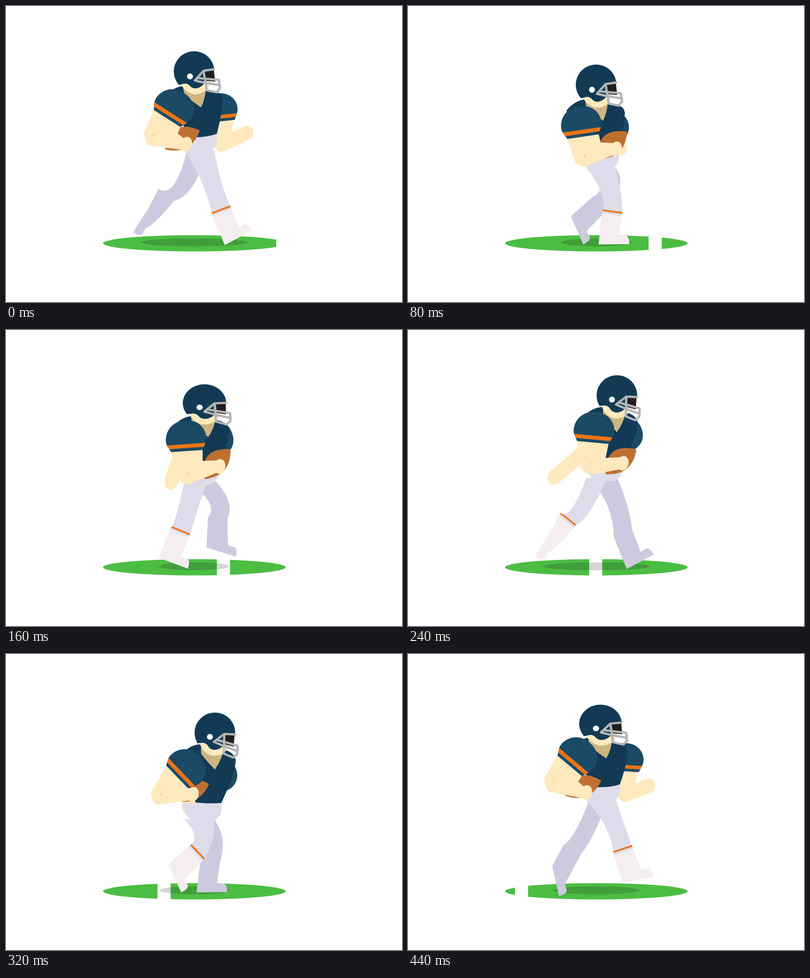
Animation of 800x600 px, one loop 480 ms. Source, as an HTML page with a canvas:

```html
<!DOCTYPE html>
<html lang="en">
<head>
<meta charset="utf-8">
<title>Running player</title>
<style>
  html, body { margin: 0; width: 100%; height: 100%; overflow: hidden; background: #fff; }
  canvas { display: block; width: 800px; height: 600px; }
</style>
</head>
<body>
<canvas id="stage" width="800" height="600"></canvas>
<script>
const ctx = document.getElementById('stage').getContext('2d');
const STEP = 40, STEPS = 12;
const NAVY = '#123a54', SLEEVE = '#1a4a66', ORANGE = '#ee7414', SKIN = '#ffe9bd',
      PANTS = '#dedbea', FAR_LEG = '#cccade', SOCK = '#f5edef';

const rad = deg => deg * Math.PI / 180;

// Harmonics of the running cycle, shared by every limb.
function cycle(k) {
  const a = 2 * Math.PI * k / STEPS;
  return {
    c1: Math.cos(a), s1: Math.sin(a),
    c2: Math.cos(2 * a), s2: Math.sin(2 * a), c3: Math.cos(3 * a)
  };
}

// Whole-body motion: quick drop on landing, slower rise, sway to and fro.
function bodyAt(k) {
  const p = k % (STEPS / 2);
  const bob = p < 2 ? p / 2 : ((6 - p) / 4) ** .8;
  const drop = bob * bob;
  const lean = 1.155 * Math.cos(2 * Math.PI * (k - 7) / STEPS);
  const sway = Math.max(-1, Math.min(1, lean));
  return {
    ...cycle(k), drop, sway,
    squash: p > 2 ? .07 * Math.sin(Math.PI * (p - 2) / 4) : 0,
    head: [401 + 21 * sway, 133 + 27 * bob],
    belt: [430.5 + 4.5 * sway, 263 + 4 * sway + 35 * drop]
  };
}

// Maps local coordinates to the stage.
function frame(x, y, deg) {
  const c = Math.cos(rad(deg)), s = Math.sin(rad(deg));
  return (u, v) => [x + u * c - v * s, y + u * s + v * c];
}

function fill(shape, color) {
  ctx.fillStyle = color;
  ctx.fill(typeof shape === 'string' ? new Path2D(shape) : shape);
}

function oval(x, y, rx, ry, color, deg = 0) {
  ctx.fillStyle = color;
  ctx.beginPath();
  ctx.ellipse(x, y, rx, ry, rad(deg), 0, 7);
  ctx.fill();
}

function local(x, y, deg, sx, sy, draw) {
  ctx.save();
  ctx.translate(x, y);
  ctx.scale(sx, sy);
  ctx.rotate(rad(deg));
  draw();
  ctx.restore();
}

function ground(k, { c2 }) {
  oval(380.5, 481, 184.5, 16.5, '#4cbd43');
  ctx.fillStyle = '#fff';
  ctx.fillRect(546 - 30 * k, 460, 26.5, 40);
  oval(380.5, 479, 71 + 37 * ((c2 + .5) / 1.5) ** 2, 8, 'rgba(20,20,25,.18)');
}

function leg(k, belt, far) {
  const { c1, s1, c2, s2, c3 } = cycle(k);
  const heel = [360 + 76 * c1 - 11.5 * s1 + 6 * c2,
                450.5 + 32 * c1 + 22.5 * s1 - 5 * c2 + 2 * s2 + 7 * c3];
  const sole = 33 - 62 * c1 - 18.5 * s1 + 14 * c2 + 8 * s2 - 13.5 * c3;
  const tilt = 16 - 30 * c1 - 5 * s1 - 7 * c2 + 9 * s2;
  const kx = 394 + 32 * c1 - 13 * s1 - 11 * c2 + 6 * s2 + (far ? 8 : 0);
  const ky = 362 - 3 * c1 + 8 * s1 - 3 * c2 + 8 * s2;
  const hipL = far ? 366 : 360, hipR = 414 + .3 * (kx - 394), hipY = belt[1] + 33;

  const foot = frame(...heel, sole), ankle = foot(41, -17);
  const stripe = frame(...foot(20, -9), tilt)(0, -58);
  const band = frame(...stripe, tilt);
  const l = band(-20, 0), r = band(20, 0);
  const shin = Math.hypot(ankle[0] - r[0], ankle[1] - r[1]);

  const path = new Path2D();
  const through = (x0, y0, x, y, x1, y1) =>
    path.quadraticCurveTo(2 * x - (x0 + x1) / 2, 2 * y - (y0 + y1) / 2, x1, y1);
  path.moveTo(hipL, hipY);
  through(hipL, hipY, kx - 20, ky, ...l);
  path.lineTo(...heel);
  path.lineTo(...foot(62, 0));
  path.quadraticCurveTo(...foot(62, -16), ...foot(54, -18));
  path.lineTo(...ankle);
  path.quadraticCurveTo(...band(20, shin * .8), ...r);
  through(...r, kx + 20, ky, hipR, hipY);
  path.closePath();
  fill(path, far ? FAR_LEG : PANTS);
  if (far) return;
  ctx.save();
  ctx.clip(path);
  ctx.translate(...stripe);
  ctx.rotate(rad(tilt));
  ctx.fillStyle = SOCK;
  ctx.fillRect(-80, 6, 160, 120);
  ctx.fillStyle = ORANGE;
  ctx.fillRect(-22, -1.6, 44, 3.4);
  ctx.restore();
}

function sleeve(x, y, deg, size) {
  local(x, y, deg, size, size, () => {
    const dome = new Path2D('M-32 0L-39 -13C-46 -30 -34 -62 0 -62C36 -62 47 -30 38 -13L32 0Z');
    fill(dome, SLEEVE);
    ctx.clip(dome);
    ctx.fillStyle = ORANGE;
    ctx.fillRect(-50, -14, 100, 8);
  });
}

function farArm({ c1, s1, c2, s2, drop }) {
  const turn = 40 - 31 * c1 + 4 * s1 - 15 * c2;
  const shoulder = frame(431 - 6 * c1 - 10 * s1 + 5 * c2 - 6 * s2, 207 + 33 * drop, turn);
  const hand = [396 + 96 * c1 - 20 * s1 - 5 * c2, 292 - 21 * c1 - 14 * c2];
  ctx.strokeStyle = SKIN;
  ctx.lineWidth = 29;
  ctx.lineJoin = 'round';
  ctx.beginPath();
  ctx.moveTo(...shoulder(13, 23));
  ctx.lineTo(393 + 42 * c1 - 20 * s1, 266 + 15 * c1 - 13 * s1);
  ctx.lineTo(...hand);
  ctx.stroke();
  oval(...hand, 13, 14.5, SKIN);
  sleeve(...shoulder(0, 27), turn, .92);
}

function hips({ belt }) {
  local(...belt, 0, 1, 1, () =>
    fill('M-79 0L0 0C2 20 -2 30 -20 40L-58 38Q-77 22 -79 0Z', PANTS));
}

function torso({ head: [hx, hy], belt: [x, y], sway }) {
  const nx = hx - 41 - 5 * sway, ny = hy + 31 - 3 * sway;
  const rx = hx + 50 - 8 * sway, ry = hy + 56;
  const p = new Path2D();
  p.moveTo(nx - 24, ny + 18);
  p.quadraticCurveTo(nx - 8, ny - 2, nx + 14, ny - 5);
  p.lineTo(nx + 60, ny + 5);
  p.quadraticCurveTo(rx - 2, ry - 18, rx, ry);
  p.quadraticCurveTo(rx - 1, ry + 26, x, y);
  p.quadraticCurveTo(x - 22, y + 5 - 3 * sway, x - 52, y + 3 - 4 * sway);
  p.closePath();
  fill(p, NAVY);
}

function helmet({ head, sway, squash }) {
  local(...head, 5.5 * (sway - 1), 1 + squash, 1 - squash, () => {
    fill('M-28 23L-28 42Q-18 56 0 74Q13 56 18 34Z', '#cdb583');
    fill('M-31 21L18 20L30 27L19 40Q5 49 -10 45Q-25 38 -31 21Z', SKIN);
    fill('M18 1L40 2L38 28L17 22Z', '#231f20');
    fill('M-35 21A41 41 0 1 1 41 1L19 2L18 24Q13 32 2 34Q-8 35 -13 28Q-17 20 -25 20Z', NAVY);
    oval(-10, 8, 6, 6, '#fff');
    ctx.strokeStyle = '#b3b5b6';
    ctx.lineWidth = 4.6;
    ctx.lineJoin = 'round';
    ctx.lineCap = 'round';
    ctx.stroke(new Path2D('M41 3L19 2L-2 18L19 27L46 37M4 14L46 26L45 43L37 50L18 42L19 2'));
    ctx.lineCap = 'butt';
  });
}

function nearArm({ c1, s1, c3, drop }) {
  const swing = -27 * c1 + 31 * s1 - 8 * c3;
  const turn = 19 + 7.7 * c1 - 29 * s1 + 6 * c3;
  const cuff = frame(349.5 - 20 * c1 + 11.5 * s1 - 4 * c3, 228 + 29 * drop + 9 * s1, turn);
  const hx = 399 + swing, hy = 275 + 12 * drop + 5 * c1;
  const ex = 331 + 1.2 * swing, ey = 288 + 28 * drop + 15 * s1 - 5 * c1;
  const ox = -17 - .2 * swing, oy = -20 + .2 * swing;

  local(hx + 27.5 - 6 * s1, hy - 28 - 8 * s1, -34 + 5 * c1 - 15 * s1, 1, 1, () =>
    fill('M0 0Q-40 -52 -80 0Q-40 36 0 0Z', '#bf6f32'));

  const p = new Path2D();
  p.moveTo(...cuff(-32, -2));
  p.lineTo(ex + ox, ey + oy);
  p.quadraticCurveTo(ex + ox * .8, ey + oy * .2, ex, ey);
  p.lineTo(hx - 4, hy + 12);
  p.lineTo(hx - 5, hy - 12);
  p.lineTo(hx - 26 - .25 * swing, hy - 16 + .15 * swing);
  p.lineTo(...cuff(32, -2));
  p.closePath();
  fill(p, SKIN);
  oval(hx, hy, 11.5, 15, SKIN, 15);
  ctx.fillStyle = '#3a2a18';
  ctx.fillRect(Math.round(ex + 3 - .17 * swing), Math.round(ey - 22), 1, 1);
  sleeve(...cuff(0, 0), turn, 1);
}

function draw(k) {
  const body = bodyAt(k);
  ctx.fillStyle = '#fff';
  ctx.fillRect(0, 0, 800, 600);
  ground(k, body);
  farArm(body);
  leg(k + STEPS / 2, body.belt, true);
  hips(body);
  leg(k, body.belt, false);
  torso(body);
  helmet(body);
  nearArm(body);
}

const start = performance.now();
function tick() {
  draw(Math.floor(Math.max(0, performance.now() - start) / STEP) % STEPS);
  requestAnimationFrame(tick);
}
tick();
</script>
</body>
</html>
```
